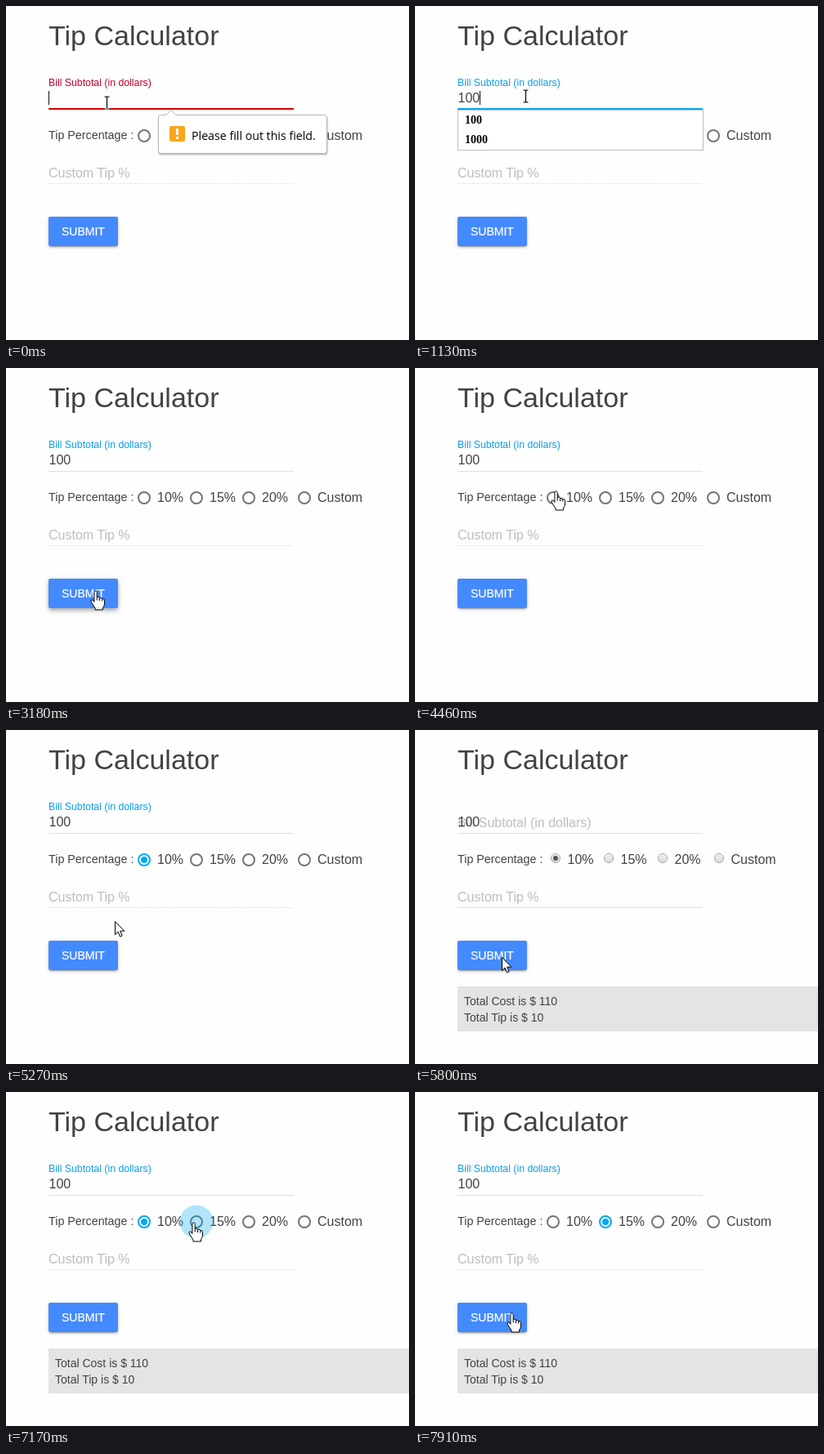
Animation of 493 by 409 pixels, one loop 8000 ms. Source, as an HTML page:

```html
<!DOCTYPE html>
<html lang="en">
<head>
<meta charset="utf-8">
<title>Tip Calculator</title>
<style>
  html, body { margin: 0; width: 100%; height: 100%; overflow: hidden; background: #fefefe; }
  svg { display: block; width: 493px; height: 409px; font-family: "Liberation Sans", Arial, sans-serif; font-size: 16px; fill: #424242; }
  .hint { fill: #bdbdbd; }
  .small { font-size: 14px; }
  .off { display: none; }
  #ibeam { mix-blend-mode: difference; }
</style>
</head>
<body>
<svg id="stage" viewBox="0 0 493 409"></svg>
<script>
const LOOP = 8000;
const BLUE = '#03a9f4';
const CHOICES = ['10%', '15%', '20%', 'Custom'];
const STYLED_X = [169, 233, 297, 365];
const PLAIN_X = [172, 237, 303, 372];

const text = (x, y, body, attrs = '') => `<text x="${x}" y="${y}" ${attrs}>${body}</text>`;
const rect = (x, y, w, h, attrs = '') => `<rect x="${x}" y="${y}" width="${w}" height="${h}" ${attrs}/>`;
const group = (id, body, attrs = '') => `<g id="${id}" ${attrs}>${body}</g>`;
const shadow = (x, y, w, h, blur, alpha) =>
  rect(x, y, w, h, `rx="2" fill="#000" fill-opacity="${alpha}" style="filter:blur(${blur}px)"`);

const styledRadio = (label, i) => {
  const x = STYLED_X[i];
  return `<circle id="ring${i}" cx="${x}" cy="159" r="7" fill="none" stroke-width="2"/>
    <circle id="dot${i}" cx="${x}" cy="159" r="4" fill="${BLUE}"/>` + text(x + 16, 164, label);
};
const plainRadio = (label, i) => {
  const x = PLAIN_X[i];
  const dot = i ? '' : `<circle cx="${x}" cy="157" r="3" fill="#555"/>`;
  return `<circle cx="${x}" cy="157" r="5.5" fill="url(#knob)" stroke="#a6a6a6"/>` + dot + text(x + 14.5, 164, label);
};

const stage = document.getElementById('stage');
stage.innerHTML = `
  <defs><linearGradient id="knob" x2="0" y2="1">
    <stop stop-color="#f4f4f4"/><stop offset="1" stop-color="#d8d8d8"/>
  </linearGradient></defs>` +
  rect(0, 0, 493, 409, 'fill="#fefefe"') +
  text(52, 48, 'Tip Calculator', 'font-size="34"') +
  text(52, 98, 'Bill Subtotal (in dollars)', 'id="label" font-size="12.3"') +
  text(52, 119, 'Bill Subtotal (in dollars)', 'id="plainLabel" class="hint"') +
  text(52.5, 118, '', 'id="amount"') +
  rect(52, 126, 300, 1, 'fill="#e0e0e0"') +
  rect(52, 125, 300, 2, 'id="focusLine"') +
  rect(0, 104, 1, 17, 'id="caret" fill="#111"') +
  text(52, 163, 'Tip Percentage :', 'font-size="14.3"') +
  group('styled', CHOICES.map(styledRadio).join('')) +
  group('plain', CHOICES.map(plainRadio).join('')) +
  `<circle id="ripple" cy="159" r="20.5" fill="${BLUE}"/>` +
  text(52, 210, 'Custom Tip %', 'class="hint"') +
  '<path id="customLine" d="M52 217.5H352" stroke="#dcdcdc"/>' +
  group('rest', shadow(52, 260, 85, 36, 1, .14) + shadow(54, 263, 81, 32, .5, .2) + shadow(52, 259, 85, 36, 2.5, .12)) +
  group('pressed', shadow(52, 262, 85, 36, 2.5, .14) + shadow(52, 259, 85, 36, 4, .12) + shadow(53, 261, 83, 34, 2, .2)) +
  rect(52, 258, 85, 36, 'rx="2" fill="#448aff"') +
  text(68, 281, 'SUBMIT', 'class="small" fill="#fff" stroke="#fff" stroke-width=".2"') +
  group('result', rect(52, 314, 441, 55, 'fill="#e4e4e4"') +
    text(60, 337, 'Total Cost is $ 110') + text(60, 357, 'Total Tip is $ 10'), 'class="small"') +
  group('tooltip', shadow(187, 136, 206, 46, 1.2, .35) +
    `<path d="M189.5 133.5H196L202 127.5L208 133.5H389.5Q392.5 133.5 392.5 136.5V177.5Q392.5 180.5 389.5 180.5H189.5Q186.5 180.5 186.5 177.5V136.5Q186.5 133.5 189.5 133.5Z" fill="#fff" stroke="#b4b4b4"/>` +
    rect(200, 147, 19, 19, 'rx="2" fill="#faa61a"') +
    rect(208, 150, 3, 8, 'fill="#fff"') + rect(208, 160, 3, 3, 'fill="#fff"') +
    text(227, 164, 'Please fill out this field.', `font-size="14.2" fill="#000" style="font-family:'Open Sans','Noto Sans',sans-serif"`)) +
  group('dropdown', rect(52.5, 127.5, 300, 49, 'fill="#fff" stroke="#bdbdbd"') +
    text(61, 144, '100') + text(61, 168, '1000'),
    `font-size="14" font-weight="bold" fill="#000" style="font-family:'Liberation Serif',Times,serif"`) +
  group('ibeam', '<path d="M-3 -7.5H-1L0 -6.5L1 -7.5H3M0 -7V7M-3 7.5H-1L0 6.5L1 7.5H3" fill="none" stroke="#fff" stroke-width="1.2"/>') +
  group('arrow', '<path d="M0 0V16L3.6 12.6L6 18.5L8.6 17.4L6.2 11.7H11.3Z" fill="#fff" stroke="#000"/>') +
  group('hand', `<path d="M-1.6 1Q-1.6 -.6 0 -.6T1.7 1V7Q4.6 5.6 5 8Q8 7 8.2 9.2Q11 8.6 11 11V15.5Q10.6 18 9 20V22.5H-.5V20.5L-5 13.5Q-6.4 11 -4.8 10.4T-1.6 13Z" fill="#fff" stroke="#000" stroke-linejoin="round"/>
    <path d="M1.7 7V11M5 8V11.5M8.2 9V12" stroke="#000" fill="none"/>`);

const $ = id => document.getElementById(id);
const show = (id, on) => $(id).classList.toggle('off', !on);
const during = (t, from, to) => t >= from && t < to;

// Pointer moves: first and last change in ms, number of steps, way points.
const MOVES = [
  { from: 140, to: 140, steps: 1, path: [[123, 118], [135, 110]] },
  { from: 1570, to: 2400, steps: 7, path: [[135, 110], [128, 185], [109, 273]] },
  { from: 3740, to: 4460, steps: 6, path: [[109, 273], [150, 235], [193, 178], [172, 151]] },
  { from: 4850, to: 5480, steps: 5, path: [[172, 151], [145, 215], [106, 278]] },
  { from: 6330, to: 6870, steps: 5, path: [[106, 278], [62, 215], [150, 127], [229, 160]] },
  { from: 7300, to: 7910, steps: 5, path: [[229, 160], [165, 225], [118, 271]] }
];

function pointerAt(t) {
  const move = MOVES.filter(m => t >= m.from).pop();
  if (!move) return MOVES[0].path[0];
  const { from, to, steps, path } = move;
  const step = to > from ? Math.floor((t - from) / (to - from) * (steps - 1) + .01) + 1 : steps;
  const p = Math.min(1, step / steps);
  const along = p * p * (3 - 2 * p) * (path.length - 1);
  const i = Math.min(path.length - 2, Math.floor(along));
  return path[i].map((v, k) => Math.round(v + (path[i + 1][k] - v) * (along - i)));
}

function pointerKind(x, y) {
  const inside = (l, t, r, b) => x >= l && x <= r && y >= t && y <= b;
  if (inside(52, 258, 137, 294) || inside(160, 147, 437, 171)) return 'hand';
  return inside(52, 103, 352, 127) ? 'ibeam' : 'arrow';
}

function draw(t) {
  const error = t < 700;
  const focused = t < 2400;
  const reloading = during(t, 5800, 5920);
  const typed = error ? '' : t < 840 ? '1' : t < 990 ? '10' : '100';
  const checked = t < 4700 ? -1 : t < 7300 ? 0 : 1;

  $('amount').textContent = typed;
  $('label').setAttribute('fill', error ? '#c4002c' : '#0a9ee8');
  $('focusLine').setAttribute('fill', error ? '#d50000' : BLUE);
  $('caret').setAttribute('x', 52 + typed.length * 9);
  $('customLine').setAttribute('stroke-dasharray', reloading ? 'none' : '1 1');
  show('label', !reloading);
  show('plainLabel', reloading);
  show('focusLine', focused);
  show('caret', focused && !during(t, 430, 700));
  show('tooltip', error);
  show('dropdown', focused && !error);
  show('styled', !reloading);
  show('plain', reloading);
  show('result', t >= 5800);

  CHOICES.forEach((_, i) => {
    $('ring' + i).setAttribute('stroke', i === checked ? BLUE : '#757575');
    show('dot' + i, i === checked);
  });

  const tap = t < 6000 ? 4580 : 7170;
  $('ripple').setAttribute('cx', STYLED_X[t < 6000 ? 0 : 1]);
  $('ripple').setAttribute('opacity', t < tap + 120 ? .3 : .15);
  show('ripple', during(t, tap, tap + 260));

  const pressed = during(t, 2400, 2540) || during(t, 3180, 3310) || during(t, 5640, 5800);
  show('pressed', pressed);
  show('rest', !pressed);

  const [x, y] = pointerAt(t);
  const kind = reloading ? 'arrow' : pointerKind(x, y);
  for (const id of ['ibeam', 'arrow', 'hand']) show(id, id === kind);
  $(kind).setAttribute('transform', `translate(${x + .5} ${y + .5})`);
}

const start = performance.now();
function tick() {
  draw((performance.now() - start) % LOOP);
  requestAnimationFrame(tick);
}
tick();
</script>
</body>
</html>
```
